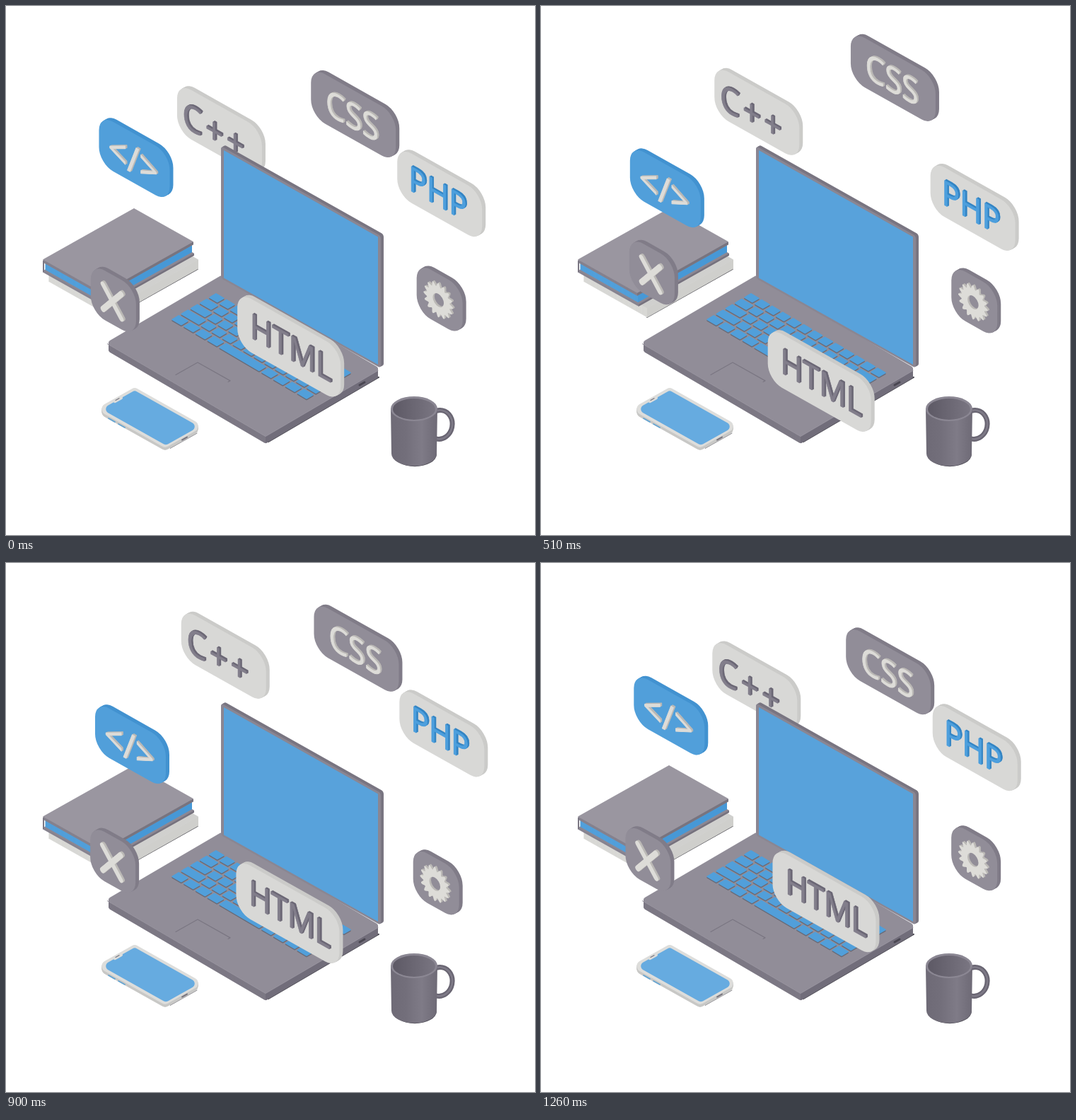
Recreate the animation shown at these times as an HTML page with a canvas. Size 748 px wide and 748 px high, loop 1290 ms.

```html
<!DOCTYPE html>
<html lang="en">
<head>
<meta charset="utf-8">
<title>Isometric coding desk</title>
<style>
  html, body { margin: 0; width: 100%; height: 100%; overflow: hidden; background: #fff; }
  canvas { display: block; width: 748px; height: 748px; }
</style>
</head>
<body>
<canvas id="stage" width="748" height="748"></canvas>
<script>
const ctx = document.getElementById('stage').getContext('2d');
const LOOP = 1290, STEP = 30, TURN = 2 * Math.PI;
const COS = 0.866, RISE = 0.487, SLOPE = RISE / COS;

const gray = { face: '#918d98', edge: '#807c88' };
const blue = { face: '#519fda', edge: '#4292d0' };
const pale = { face: '#d8d8d6', edge: '#cbcbc9' };
const ink = { face: '#827e8b', edge: '#6b6775' };
const sky = { face: '#4d9fdd', edge: '#3485c4' };
const chalk = { face: '#dddcd8', edge: '#bbb9b6' };

// Draws in the plane of the upright panels
function upright(x, y, draw) {
  ctx.setTransform(COS, RISE, 0, 1, x, y);
  draw();
  ctx.setTransform(1, 0, 0, 1, 0, 0);
}

function panel(x, y, w, h, radius, depth, skin) {
  for (let d = depth; d >= 0; d--) {
    upright(x + d, y - d * SLOPE, () => {
      ctx.fillStyle = d ? skin.edge : skin.face;
      ctx.beginPath();
      ctx.roundRect(0, 0, w / COS, h, radius);
      ctx.fill();
    });
  }
}

// Maps lengths along the floor, a to the right and b to the left
const floor = (x, y, slope = SLOPE) => (a, b) => [x + a - b, y + (a + b) * slope];
const drop = ([x, y], h) => [x, y + h];

function poly(points, fill, radius = 0) {
  const [first] = points, last = points.at(-1);
  ctx.beginPath();
  ctx.moveTo((last[0] + first[0]) / 2, (last[1] + first[1]) / 2);
  points.forEach((p, i) => ctx.arcTo(...p, ...points[(i + 1) % points.length], radius));
  ctx.closePath();
  ctx.fillStyle = fill;
  ctx.fill();
}

function line(points, color, width = 1) {
  ctx.beginPath();
  points.forEach(p => ctx.lineTo(...p));
  ctx.strokeStyle = color;
  ctx.lineWidth = width;
  ctx.lineCap = ctx.lineJoin = 'round';
  ctx.stroke();
}

const quad = (at, a0, b0, a1, b1) => [at(a0, b0), at(a1, b0), at(a1, b1), at(a0, b1)];

function slab(at, a, b, h, radius, top, left, right = left) {
  const shape = quad(at, 0, 0, a, b);
  for (let d = h; d > 0; d--) poly(shape.map(p => drop(p, d)), left, radius);
  if (right !== left) {
    const near = at(a, b), far = at(a, radius);
    poly([near, far, drop(far, h), drop(near, h)], right);
  }
  poly(shape, top, radius);
}

function gearShape() {
  const teeth = 16, steps = teeth * 12;
  ctx.beginPath();
  for (let i = 0; i < steps; i++) {
    const a = i / steps * TURN;
    const r = 21.5 + 2.7 * Math.cos(teeth * a);
    ctx.lineTo(r * Math.cos(a), r * Math.sin(a));
  }
  ctx.closePath();
  ctx.moveTo(9, 0);
  ctx.arc(0, 0, 9, 0, TURN);
  ctx.fill('evenodd');
}

function crossShape() {
  line([[-15, -17], [15, 17]], ctx.fillStyle, 7.5);
  line([[15, -18], [-15, 18]], ctx.fillStyle, 7.5);
}

const label = (text, size, gap = 0) => () => {
  ctx.font = `${size}px "Open Sans", "Noto Sans", sans-serif`;
  ctx.letterSpacing = `${gap}px`;
  ctx.textAlign = 'center';
  ctx.lineJoin = 'round';
  ctx.lineWidth = 0.8;
  ctx.strokeStyle = ctx.fillStyle;
  ctx.fillText(text, 0, size * 0.357);
  ctx.strokeText(text, 0, size * 0.357);
};

// x, y: corner at mid travel; low: time of the lowest position
const tiles = {
  cpp:   { x: 244.6, y: 87,  w: 120, low: 150,  skin: pale, mark: ink,   draw: label('C++', 51, 5), dx: -5 },
  css:   { x: 434.8, y: 58,  w: 120, low: -30,  skin: gray, mark: chalk, draw: label('CSS', 50) },
  php:   { x: 553,   y: 199, w: 120, low: 335,  skin: pale, mark: sky,   draw: label('PHP', 49), dx: -1, dy: -2 },
  gear:  { x: 579.3, y: 372, w: 65,  low: 888,  skin: gray, mark: chalk, draw: gearShape },
  code:  { x: 128,   y: 179, w: 100, low: 700,  skin: blue, mark: chalk, draw: label('</>', 54), dy: 1 },
  cross: { x: 121.6, y: 350, w: 64,  low: 1068, skin: gray, mark: chalk, draw: crossShape, dy: 1 },
  html:  { x: 324.3, y: 425, w: 146, low: 513,  skin: pale, mark: ink,   draw: label('HTML', 49), h: 76, dx: 4 }
};

function drawTile({ x, y, w, h = 70, low, skin, mark, draw, dx = 0, dy = 0 }, time) {
  const sway = Math.cos((time - low) / LOOP * TURN);
  x -= 3.6 * sway;
  y += 27.5 * sway;
  panel(x, y, w, h, 23, 5, skin);
  const cx = x + w / 2 + dx, cy = y + w * SLOPE / 2 + h / 2 + dy;
  for (let k = 0; k <= 3; k++) {
    upright(cx + 0.5 - k * 0.8, cy - 0.3 + k * 0.45, () => {
      ctx.fillStyle = k < 3 ? mark.edge : mark.face;
      draw();
    });
  }
}

function drawBooks() {
  const lower = floor(182, 308);
  line([drop(lower(90, 122), 13), drop(lower(90, 1), 13)], '#44434a', 1.5);
  slab(lower, 90, 122, 13, 0, '#d0d0ce', '#d8d8d5', '#cfcfcc');
  slab(floor(181, 302), 85, 128, 3, 0, '#8b8793', '#87838f', '#76727e');
  slab(floor(181, 290), 82, 126, 12, 0, '#519fda', '#519fda', '#4798d6');
  slab(floor(181, 286), 84, 129, 4, 0, '#9a96a0', '#85818d', '#78747f');
  line([[53, 361], [53, 376]], '#7b7783', 2);
}

function keyWidths(row) {
  const columns = 13;
  if (row === 4) {
    const single = Array(4).fill((columns - 4) / 8);
    return [...single, 4, ...single];
  }
  const lead = 1 + row * 0.3;
  const singles = Math.floor(columns - lead - 1);
  return [lead, ...Array(singles).fill(1), columns - lead - singles];
}

function drawKeys() {
  const at = floor(297, 404.5, 0.588), unit = 194 / 13, pitch = 66 / 5;
  for (let row = 0; row < 5; row++) {
    let a = 0;
    for (const width of keyWidths(row)) {
      const next = a + width * unit;
      const key = quad(at, a + 1.2, row * pitch + 1.2, next - 1.2, (row + 1) * pitch - 1.2);
      poly(key.map(p => drop(p, 1.5)), '#686975', 1);
      poly(key, '#519fda', 1);
      a = next;
    }
  }
}

function drawLaptop() {
  const at = floor(304, 381, 0.585), a = 226, b = 163;
  line([drop(at(a, b - 4), 10), drop(at(a, 3), 10)], '#45434c', 2);
  slab(at, a, b, 10, 4, gray.face, '#7c7884', '#716d7a');
  line([at(2, b), at(a, b), at(a, 4)], '#98949f');
  line([[500, 536], [507, 532]], '#4a4752', 3);
  drawKeys();
  const pad = floor(271, 504);
  line([pad(0, 31), pad(0, 0), pad(46, 0), pad(46, 3)], '#7a7682', 1.2);

  panel(304, 198, 226, 187, 4, 4, { face: '#8a8692', edge: '#797581' });
  upright(308, 204, () => {
    ctx.fillStyle = '#58a2db';
    ctx.fillRect(0, 0, 218 / COS, 180.5);
  });
}

function drawPhone() {
  const at = floor(182, 539);
  slab(at, 98, 55, 4, 8, '#dddddb', '#c8c8c6');
  poly(quad(at, 4, 4, 95, 51), '#66abe0', 6);
  line([at(4, 23), at(4, 32)], '#dddddb', 4);
  line([at(3, 25), at(3, 30)], '#77747e', 1.2);
  for (const a of [18, 32]) line([drop(at(a, 55), 3), drop(at(a + 9, 55), 3)], '#65a5d3', 1.8);
  line([drop(at(98, 31), 2), drop(at(98, 24), 2)], '#77747e', 2);
  line([drop(at(98, 48), 4.5), drop(at(98, 10), 4.5)], '#77757a', 0.8);
}

function gradient(x0, x1, ...stops) {
  const g = ctx.createLinearGradient(x0, 0, x1, 0);
  stops.forEach((c, i) => g.addColorStop(i / (stops.length - 1), c));
  return g;
}

function oval(x, y, rx, ry, fill) {
  ctx.beginPath();
  ctx.ellipse(x, y, rx, ry, 0, 0, TURN);
  ctx.fillStyle = fill;
  ctx.fill();
}

function drawMug() {
  const x = 577, rim = 569.5, base = 633, rx = 33, ry = 17.5;
  for (const [color, width] of [['#696572', 7], ['#7e7a87', 2.5]]) {
    ctx.beginPath();
    ctx.ellipse(613, 592, 18, 20.5, 0.2, 0, TURN);
    ctx.strokeStyle = color;
    ctx.lineWidth = width;
    ctx.stroke();
  }
  oval(x + 1, base + 0.7, rx - 2, ry, '#4e4b55');
  ctx.beginPath();
  ctx.moveTo(x - rx, rim);
  ctx.ellipse(x, base, rx - 1, ry, 0, Math.PI, 0, true);
  ctx.lineTo(x + rx, rim);
  ctx.fillStyle = gradient(x - rx, x + rx, '#6e6a76', '#736f7b', '#7f7b87', '#6e6a76');
  ctx.fill();
  oval(x, rim, rx, ry, '#8b8793');
  oval(x, rim + 0.5, rx - 3, ry - 2.5, gradient(x - rx, x + rx, '#5c5864', '#6b6773', '#7b7783'));
}

function render(time) {
  ctx.fillStyle = '#fff';
  ctx.fillRect(0, 0, 748, 748);
  const show = (...names) => names.forEach(name => drawTile(tiles[name], time));
  show('cpp', 'css', 'php', 'gear');
  drawBooks();
  show('code');
  drawLaptop();
  show('cross', 'html');
  drawPhone();
  drawMug();
}

const start = performance.now();
function tick() {
  const elapsed = (performance.now() - start) % LOOP;
  render(Math.floor(elapsed / STEP) * STEP);
  requestAnimationFrame(tick);
}
tick();
</script>
</body>
</html>
```
